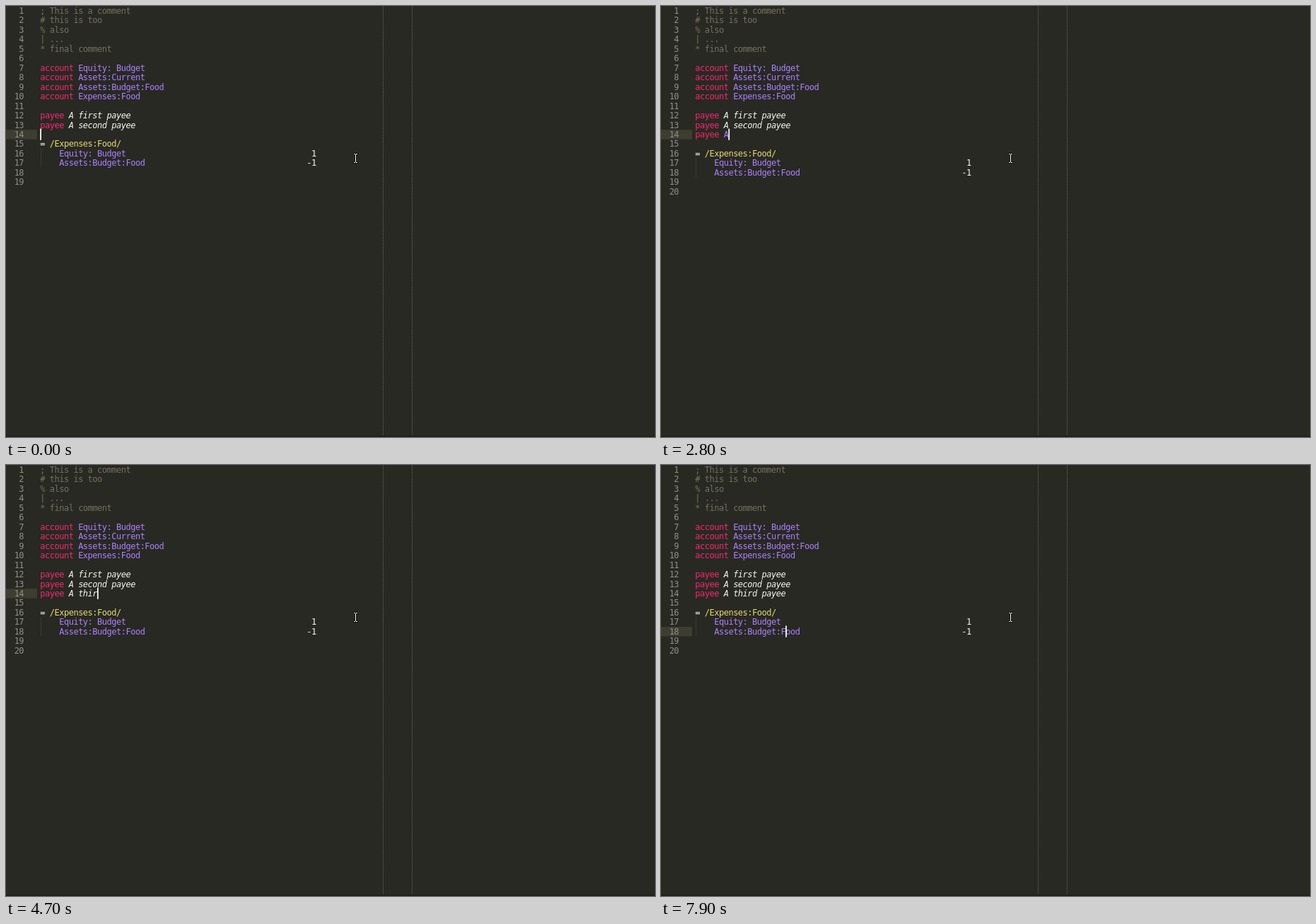
Write an HTML page with a canvas that moves like this. It is 918 px wide and 610 px high and loops after 8 s.

```html
<!DOCTYPE html>
<html>
<head>
<meta charset="utf-8">
<style>
  html, body { margin: 0; width: 918px; height: 610px; overflow: hidden; background: #282923; }
  canvas { display: block; }
</style>
</head>
<body>
<canvas id="stage" width="918" height="610"></canvas>
<script>
const ctx = document.getElementById('stage').getContext('2d');
const LOOP = 8000, LEFT = 48.6, CHAR = 6.73, LINE = 13.47, ROW = 17.3;
const FONT = '12px "DejaVu Sans Mono", monospace';
const PINK = '#f92672', PURPLE = '#ae81ff', YELLOW = '#e6db74', WHITE = '#f8f8f2', GREY = '#75715e';

// Each line is a list of [text, colour, font style] runs.
const comment = text => [[text, GREY]];
const account = name => [['account ', PINK], [name, PURPLE]];
const payee = name => [['payee ', PINK], [name, WHITE, 'italic']];
const posting = (name, amount) => [['    ' + name, PURPLE], [amount.padStart(54 - name.length), WHITE]];

const head = [
  comment('; This is a comment'), comment('# this is too'), comment('% also'),
  comment('| ...'), comment('* final comment'), [],
  account('Equity: Budget'), account('Assets:Current'),
  account('Assets:Budget:Food'), account('Expenses:Food'), [],
  payee('A first payee'), payee('A second payee')
];
const tail = [
  [['= ', WHITE], ['/Expenses:Food/', YELLOW]],
  posting('Equity: Budget', '1'), posting('Assets:Budget:Food', '-1'), [], []
];

// Key presses: time, cursor line, cursor column, number of typed characters.
const typed = 'payee A third payee';
const type = (time, count) => [time, 14, count, count];
const keys = [
  [-100, 14, 0, 0], [400, 15, 0, 0], [600, 14, 0, 0],
  type(1300, 1), type(1500, 2), type(1800, 3), type(2000, 4), type(2200, 5), type(2300, 6),
  type(2800, 7), type(3000, 8), type(3400, 9), type(4300, 10), type(4500, 11), type(4700, 12),
  type(5000, 13), type(5200, 14), type(5900, 15), type(6100, 16), type(6600, 17), type(6800, 18),
  type(7000, 19),
  [7400, 15, 0, 19], [7600, 16, 17, 19], [7800, 17, 19, 19], [7900, 18, 19, 19]
];

const words = ['payee', 'too', 'this', 'This', 'account', 'Assets', 'also', 'A first payee', 'A second payee'];
const popups = [[1400, 2200], [2900, 3000], [3400, 4700], [6000, 7000]];

function rect(x, y, w, h, color) {
  ctx.fillStyle = color;
  ctx.fillRect(x, y, w, h);
}

function text(str, x, y, color, style = '') {
  ctx.font = style + ' ' + FONT;
  ctx.fillStyle = color;
  [...str].forEach((c, i) => c !== ' ' && ctx.fillText(c, x + i * CHAR - 0.3, y));
}

function dotted(x, y, h, color) {
  ctx.strokeStyle = color;
  ctx.setLineDash([0.84, 0.84]);
  ctx.beginPath();
  ctx.moveTo(x, y);
  ctx.lineTo(x, y + h);
  ctx.stroke();
}

function entry(count) {
  const str = typed.slice(0, count);
  if (count < 6) return [[str, WHITE]];
  return count < 9 ? [['payee ', PINK], [str.slice(6), PURPLE]] : payee(str.slice(6));
}

function drawLine(runs, index) {
  const y = index * LINE + 10.9, number = String(index + 1);
  text(number, 25.4 - number.length * CHAR, y, '#8f908a');
  let x = LEFT;
  for (const [str, color, style] of runs) {
    text(str, x, y, color, style);
    x += str.length * CHAR;
  }
}

function drawPopup(count) {
  const word = typed.slice(0, count).split(' ').pop();
  const items = words.filter(w => w.toLowerCase().startsWith(word.toLowerCase()));
  const x = LEFT + (count - word.length) * CHAR, top = 14 * LINE;
  items.forEach((item, i) => {
    const y = top + i * ROW;
    rect(x - 5, y, 288, ROW, i ? '#33342e' : '#5c5d56');
    text(item.slice(0, word.length), x, y + 12.5, '#ffffff', 'bold');
    text(item.slice(word.length), x + word.length * CHAR, y + 12.5, '#e8e8e2');
  });
}

function drawMouse() {
  for (const [grow, color] of [[1, '#10110e'], [0, '#ffffff']]) {
    const bar = (x, y, w, h) => rect(x - grow, y - grow, w + 2 * grow, h + 2 * grow, color);
    bar(494, 210, 1, 11);
    for (const y of [209, 221]) {
      bar(492, y, 2, 1);
      bar(495, y, 2, 1);
    }
  }
}

function draw(t) {
  const [time, line, col, count] = keys.filter(k => k[0] <= t).pop();
  const lines = [...head, entry(count), ...(t < 400 ? [] : [[]]), ...tail];
  const top = (line - 1) * LINE;

  rect(0, 0, 918, 610, '#282923');
  rect(0, 608, 918, 2, '#20211c');
  rect(0, top, 44, LINE, '#3e3d32');
  dotted(533.5, 0, 608, '#66675f');
  dotted(574.5, 0, 608, '#66675f');
  dotted(49.5, (lines.length - 4) * LINE, 2 * LINE, '#4a4b44');
  lines.forEach(drawLine);

  if (popups.some(([from, to]) => t >= from && t < to)) drawPopup(count);

  // The caret stays solid for a while after a key, then fades in steps.
  const fade = Math.floor((t - time) / 100) - 2;
  ctx.globalAlpha = 1 - Math.min(Math.max(fade, 0), 4) / 4;
  rect(LEFT + col * CHAR - 0.4, top - 1.5, 1.8, 16.2, WHITE);
  ctx.globalAlpha = 1;
  drawMouse();
}

function tick() {
  draw(performance.now() % LOOP);
  requestAnimationFrame(tick);
}
tick();
</script>
</body>
</html>
```
